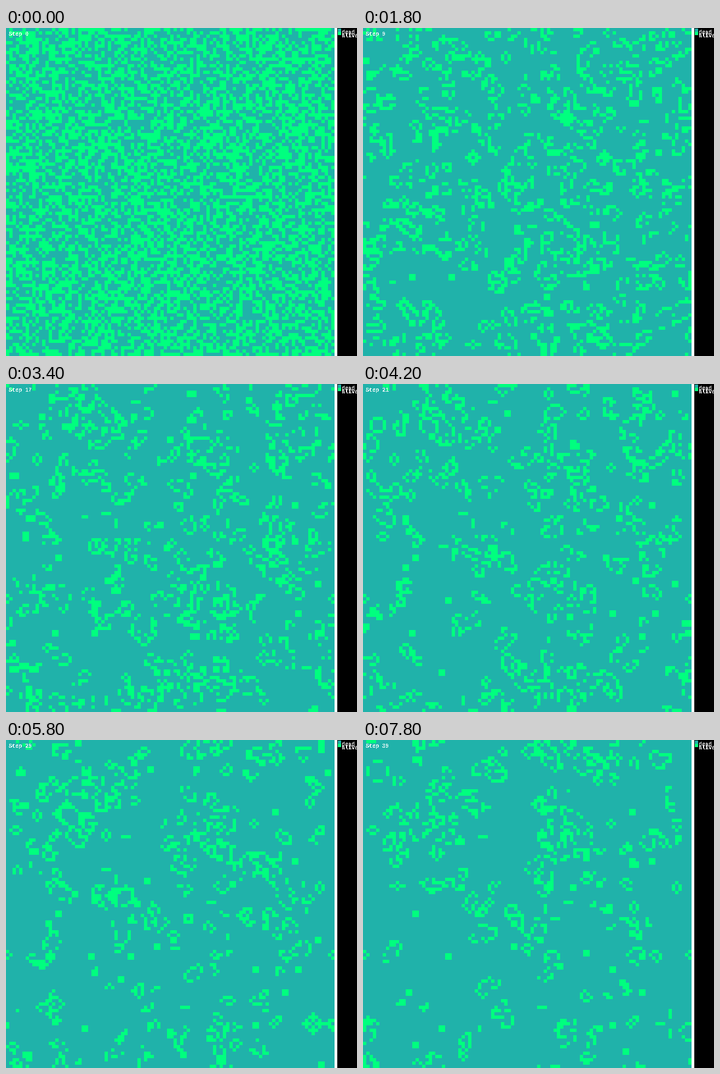
These frames come from a looping animation (641x600 px, 8000 ms). A matplotlib script:

```python
import numpy as np
import matplotlib.pyplot as plt
from matplotlib.animation import FuncAnimation
from matplotlib.colors import ListedColormap
from matplotlib.patches import Rectangle

W, H, DPI = 641, 600, 64
N, CELL = 100, 6
STEPS, STEP_MS = 40, 200
DEAD, ALIVE = "#20b2aa", "#00ff7f"


def evolve(grid):
    """One generation of Conway's Life on a torus."""
    near = sum(
        np.roll(grid, (dy, dx), (0, 1))
        for dy in (-1, 0, 1)
        for dx in (-1, 0, 1)
        if dy or dx
    )
    return ((near == 3) | ((grid == 1) & (near == 2))).astype(int)


def run_life(seed):
    grid = np.random.RandomState(seed).randint(0, 2, (N, N))
    history = [grid]
    for _ in range(STEPS - 1):
        history.append(evolve(history[-1]))
    return history


history = run_life(42)

fig = plt.figure(figsize=(W / DPI, H / DPI), dpi=DPI, facecolor="white")
ax = fig.add_axes([0, 0, 1, 1])
ax.axis("off")

board = ax.imshow(
    history[0],
    cmap=ListedColormap([DEAD, ALIVE]),
    vmin=0,
    vmax=1,
    extent=(0, N * CELL, N * CELL, 0),
    interpolation="nearest",
    aspect="auto",
)
ax.set_xlim(0, W)
ax.set_ylim(H, 0)


def box(x, y, w, h, color):
    ax.add_patch(Rectangle((x, y), w, h, fc=color, lw=0, antialiased=False))


def label(x, baseline, text):
    return ax.text(
        x, baseline, text,
        family="Liberation Mono", weight="bold", size=10 * 72 / DPI,
        color="white", va="baseline", antialiased=False, clip_on=True,
    )


# legend panel
box(605, 0, W - 605, H, "black")
for i, (name, color) in enumerate([("dead", DEAD), ("alive", ALIVE)]):
    box(606, 1 + i * CELL, CELL, CELL, color)
    label(613, 11 + i * CELL, name)

caption = label(5, 14, "Step 0")


def update(step):
    board.set_data(history[step])
    caption.set_text(f"Step {step}")
    return board, caption


anim = FuncAnimation(
    fig, update, frames=STEPS, interval=STEP_MS, repeat=True, repeat_delay=0
)
plt.show()
```
